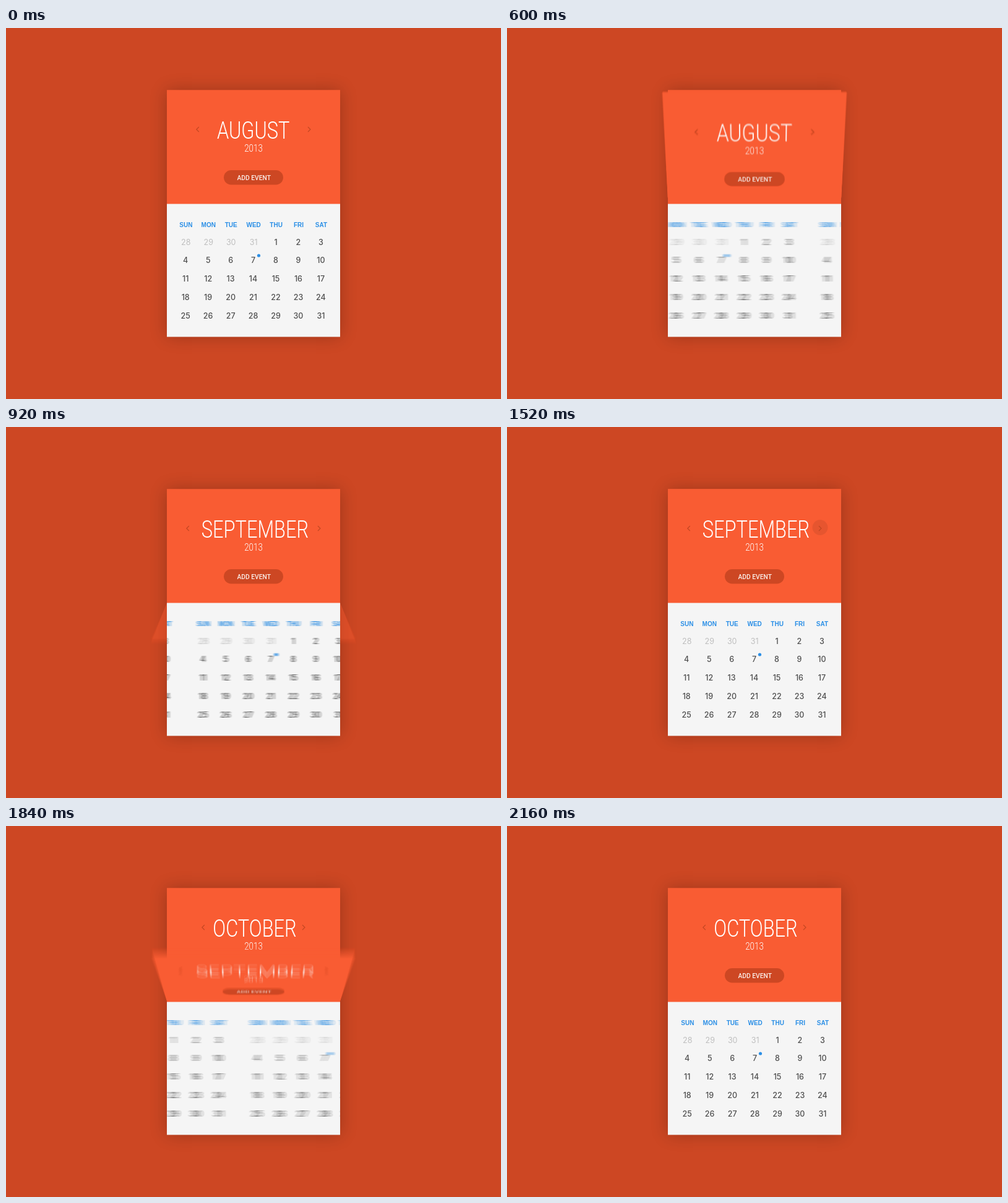
An HTML page with a canvas that plays this animation: 800x600 px, repeating every 2.48 s.

```html
<!DOCTYPE html>
<html lang="en">
<head>
<meta charset="utf-8">
<title>Calendar</title>
<style>
  html, body { margin: 0; width: 100%; height: 100%; overflow: hidden; background: #cd4723; }
  canvas { display: block; width: 800px; height: 600px; }
</style>
</head>
<body>
<canvas id="stage" width="800" height="600"></canvas>
<script>
const LOOP = 2480, STEP = 40, SHUTTER = 20, SAMPLES = 12;
const CARD = { x: 260, y: 100, w: 280, fold: 184, panel: 215 };
const EDGE = 0.5; // the card's horizontal edges sit between pixel rows
const FOLD_Y = CARD.y + CARD.fold, MID = CARD.x + CARD.w / 2;
const BG = '#cd4723', ORANGE = '#f95c33', PAPER = '#f5f5f5', BLUE = '#2b8fe6';
const PERSPECTIVE = 1110, FOLD_ANGLE = 113 * Math.PI / 180;
const FOLD_TIME = 560, SLIDE_TIME = 640;

const MONTHS = [
  { name: 'AUGUST', x: 399.7, arrow: 90 },
  { name: 'SEPTEMBER', x: 402.4, arrow: 106 },
  { name: 'OCTOBER', x: 402, arrow: 81 }
];
const TURNS = [{ start: 440, gap: 280 }, { start: 1520, gap: 281 }];

const clamp = (v) => Math.min(1, Math.max(0, v));
const smooth = (v) => { v = clamp(v); return v * v * (3 - 2 * v); };

// Bezier ease with control points (.32, 0) and (.53, 1).
function slideEase(x) {
  x = clamp(x);
  let lo = 0, hi = 1;
  for (let i = 0; i < 24; i++) {
    const s = (lo + hi) / 2, r = 1 - s;
    if (3 * s * r * r * 0.32 + 3 * s * s * r * 0.53 + s * s * s < x) lo = s; else hi = s;
  }
  return smooth(lo);
}

function layer(draw) {
  const canvas = document.createElement('canvas');
  canvas.width = 800;
  canvas.height = 600;
  const c = canvas.getContext('2d');
  c.textAlign = 'center';
  if (draw) draw(c);
  return canvas;
}

function label(c, text, x, y, font, color) {
  c.font = font;
  c.fillStyle = color;
  c.fillText(text, x, y);
}

// Condensed face; the ratio is relative to the normal width of the same weight.
function narrow(c, text, x, y, weight, size, ratio, color) {
  const face = `${size}px Roboto, sans-serif`;
  c.font = `${weight} ${face}`;
  const normal = c.measureText(text).width;
  c.font = `${weight} condensed ${face}`;
  const condensed = c.measureText(text).width;
  c.save();
  c.translate(x, y);
  c.scale(ratio * normal / condensed, 1);
  c.fillStyle = color;
  c.fillText(text, 0, 0);
  c.restore();
}

function chevron(c, x, dir) {
  c.beginPath();
  c.moveTo(x - 2 * dir, 160);
  c.lineTo(x + 2 * dir, 164);
  c.lineTo(x - 2 * dir, 168);
  c.strokeStyle = '#c24722';
  c.lineWidth = 1.15;
  c.stroke();
}

function header(month, pressed) {
  return layer((c) => {
    c.fillStyle = ORANGE;
    c.fillRect(CARD.x, CARD.y + EDGE, CARD.w, CARD.fold + EDGE);
    if (pressed) {
      c.fillStyle = 'rgba(0,0,0,.075)';
      c.beginPath();
      c.arc(MID + month.arrow, 162.5, 12.5, 0, 7);
      c.fill();
    }
    chevron(c, MID - month.arrow - 0.2, -1);
    chevron(c, MID + month.arrow, 1);
    narrow(c, month.name, month.x, 178.5, 300, 39.5, 0.78, '#fff');
    narrow(c, '2013', MID, 200, 300, 17, 0.785, '#fff');
    c.fillStyle = BG;
    c.beginPath();
    c.roundRect(352, 230, 96, 23.5, 11.75);
    c.fill();
    narrow(c, 'ADD EVENT', MID + 0.7, 245.5, 500, 11.7, 0.88, '#fbeee9');
  });
}

const backdrop = layer((c) => {
  c.fillStyle = BG;
  c.fillRect(0, 0, 800, 600);
  c.shadowColor = 'rgba(0,0,0,.24)';
  c.shadowBlur = 26;
  c.fillStyle = ORANGE;
  c.fillRect(CARD.x, CARD.y + EDGE, CARD.w, CARD.fold + CARD.panel - EDGE);
});

const page = layer((c) => {
  const colX = (i) => 290.2 + 36.45 * i;
  'SUN MON TUE WED THU FRI SAT'.split(' ').forEach((day, i) =>
    label(c, day, colX(i) + 0.6, 321.5, 'bold 10px "Liberation Sans", Arial, sans-serif', BLUE));
  for (let i = 0; i < 35; i++) {
    const past = i < 4;
    label(c, past ? 28 + i : i - 3, colX(i % 7) + (past ? 0.6 : 0),
      350.5 + 29.8 * Math.floor(i / 7),
      `${past ? 400 : 500} 12.5px Inter, sans-serif`, past ? '#bfbfbf' : '#4e4e4e');
  }
  c.fillStyle = BLUE;
  c.beginPath();
  c.arc(408.5, 368, 2.6, 0, 7);
  c.fill();
});

const plain = MONTHS.map((m) => header(m, false));
const pressed = MONTHS.map((m) => header(m, true));

// Draws the header leaf rotated about the fold, one pixel row at a time.
function drawLeaf(c, leaf, angle) {
  const cos = Math.cos(angle), depth = Math.sin(angle) / PERSPECTIVE, dir = cos < 0 ? -1 : 1;
  const heightAt = (d) => d ? d * dir / (cos + d * dir * depth) : 0;
  for (let row = 0; row < 300; row++) {
    const near = heightAt(row), next = heightAt(row + 1);
    if (near >= CARD.fold - 0.01) break;
    const far = Math.min(CARD.fold, next);
    const rowH = (far - near) / (next - near);
    const scale = 1 / (1 - depth * (near + far) / 2);
    const y = dir > 0 ? FOLD_Y - row - rowH : FOLD_Y + row;
    c.drawImage(leaf, CARD.x, FOLD_Y - far, CARD.w, far - near,
      MID - CARD.w / 2 * scale, y, CARD.w * scale, rowH);
  }
}

function drawPage(c, x) {
  c.drawImage(page, CARD.x, FOLD_Y, CARD.w, CARD.panel, CARD.x + x, FOLD_Y, CARD.w, CARD.panel);
}

function drawScene(c, t) {
  const index = t < TURNS[1].start - 20 ? 0 : 1;
  const { start, gap } = TURNS[index];
  const age = t - start;
  const leaf = (age > -20 && age < 60 ? pressed : plain)[index];

  c.drawImage(backdrop, 0, 0);
  c.drawImage(age < 0 ? leaf : plain[index + 1], 0, 0);
  const opacity = 1 - clamp((age - 360) / 220);
  if (age >= 0 && opacity > 0) {
    c.globalAlpha = opacity;
    drawLeaf(c, leaf, FOLD_ANGLE * smooth(age / FOLD_TIME));
    c.globalAlpha = 1;
  }

  const shift = CARD.w * slideEase(age / SLIDE_TIME);
  c.save();
  c.beginPath();
  c.rect(CARD.x, FOLD_Y, CARD.w, CARD.panel + 1);
  c.clip();
  c.fillStyle = PAPER;
  c.fillRect(CARD.x, FOLD_Y + EDGE, CARD.w, CARD.panel);
  drawPage(c, -shift);
  drawPage(c, gap - shift);
  c.restore();
}

const stage = document.getElementById('stage').getContext('2d');
const buffer = layer();
const bufferCtx = buffer.getContext('2d');

// Averages several moments around t for motion blur.
function render(t) {
  const moving = TURNS.some(({ start }) => t > start && t < start + SLIDE_TIME);
  const count = moving ? SAMPLES : 1;
  for (let i = 0; i < count; i++) {
    drawScene(bufferCtx, t + ((i + 0.5) / count - 0.5) * SHUTTER);
    stage.globalAlpha = 1 / (i + 1);
    stage.drawImage(buffer, 0, 0);
  }
}

const origin = performance.now();
let shown = -1;
function tick() {
  const t = Math.floor((performance.now() - origin) % LOOP / STEP) * STEP;
  if (t !== shown) render(shown = t);
  requestAnimationFrame(tick);
}
tick();
</script>
</body>
</html>
```
